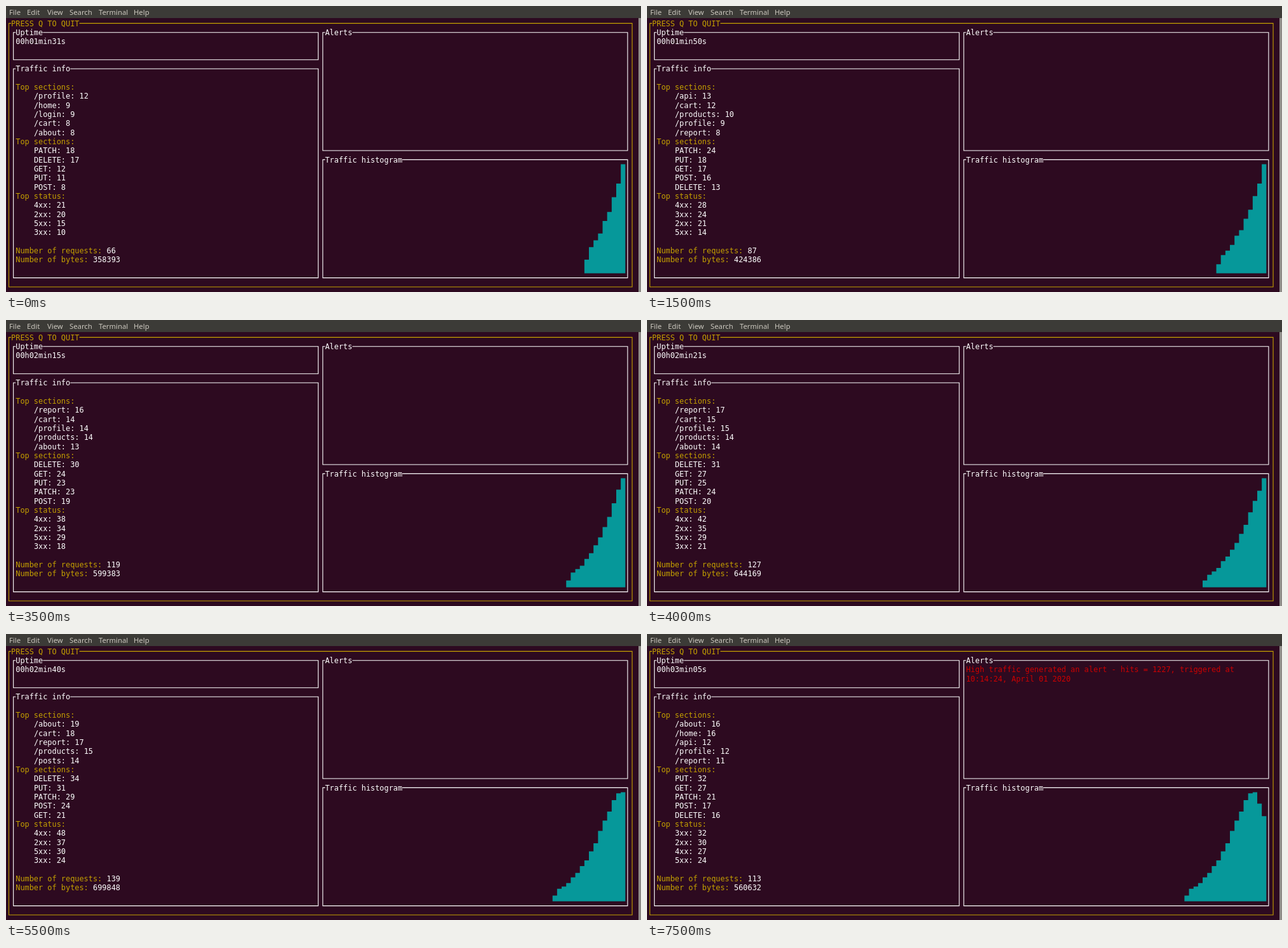
Animation of 1000 by 451 pixels, one loop 8 s. Source, as an HTML page with a canvas:

```html
<!DOCTYPE html>
<html lang="en">
<head>
<meta charset="utf-8">
<title>Traffic monitor</title>
<style>
  html, body { margin: 0; width: 100%; height: 100%; overflow: hidden; background: #2d0a20; }
  canvas { display: block; }
</style>
</head>
<body>
<canvas id="screen" width="1000" height="451"></canvas>
<script>
const ctx = document.getElementById('screen').getContext('2d');
const LOOP = 8000, TICK = 500;
const CELL_W = 7.165, CELL_H = 14.33;
const WHITE = '#ffffff', YELLOW = '#c4a000', TEAL = '#06989a', RED = '#cc0000';

const snapshot = (tick, bytes, ...lists) => ({
  tick, bytes,
  lists: lists.map(list => list.split(', ').map(entry => {
    const [name, count] = entry.split(' ');
    return { name, count: +count };
  }))
});

const snapshots = [
  snapshot(0, 358393, '/profile 12, /home 9, /login 9, /cart 8, /about 8',
    'PATCH 18, DELETE 17, GET 12, PUT 11, POST 8', '4xx 21, 2xx 20, 5xx 15, 3xx 10'),
  snapshot(2, 364156, '/api 13, /cart 11, /products 9, /profile 8, /report 7',
    'PATCH 23, PUT 15, GET 15, POST 14, DELETE 10', '4xx 26, 3xx 20, 2xx 18, 5xx 13'),
  snapshot(5, 544846, '/cart 14, /profile 13, /contact 12, /home 11, /api 11',
    'DELETE 26, PUT 23, GET 21, POST 19, PATCH 18', '2xx 33, 4xx 31, 5xx 26, 3xx 17'),
  snapshot(7, 599383, '/report 16, /cart 14, /profile 14, /products 14, /about 13',
    'DELETE 30, GET 24, PUT 23, PATCH 23, POST 19', '4xx 38, 2xx 34, 5xx 29, 3xx 18'),
  snapshot(10, 733740, '/about 19, /cart 18, /report 17, /products 15, /posts 15',
    'DELETE 34, PUT 32, PATCH 29, POST 27, GET 22', '4xx 51, 2xx 38, 5xx 29, 3xx 26'),
  snapshot(13, 632063, '/about 19, /contact 17, /login 16, /cart 14, /home 12',
    'PATCH 34, POST 29, GET 28, DELETE 19, PUT 19', '4xx 41, 5xx 35, 2xx 32, 3xx 21'),
  snapshot(15, 560632, '/about 16, /home 16, /api 12, /profile 12, /report 11',
    'PUT 32, GET 27, PATCH 21, POST 17, DELETE 16', '3xx 32, 2xx 30, 4xx 27, 5xx 24')
];

// One histogram bar for every ten seconds of uptime.
const traffic = [5.6, 11, 13.5, 16.6, 21.5, 25.2, 31.2, 36.9, 44.5,
  51.8, 62.2, 71.6, 79.7, 89.5, 95.2, 96, 86, 75];

// Left edge of a column and vertical centre of a row in the character grid.
const colX = col => 0.9 + col * CELL_W;
const rowY = row => 27.4 + row * CELL_H;
const pad = n => String(n).padStart(2, '0');

function text(str, col, row, color = WHITE) {
  ctx.font = '11.9px "DejaVu Sans Mono", monospace';
  ctx.fillStyle = color;
  ctx.fillText(str, colX(col), rowY(row) + 4.4);
}

function panel(title, left, top, right, bottom, color = WHITE) {
  const [x1, x2] = [left, right].map(col => colX(col + 0.5));
  const [y1, y2] = [top, bottom].map(rowY);
  ctx.strokeStyle = color;
  ctx.lineWidth = 1.1;
  ctx.beginPath();
  ctx.moveTo(colX(left + 1), y1);
  ctx.lineTo(x1, y1);
  ctx.lineTo(x1, y2);
  ctx.lineTo(x2, y2);
  ctx.lineTo(x2, y1);
  ctx.lineTo(colX(left + 1 + title.length), y1);
  ctx.stroke();
  text(title, left + 1, top, color);
}

function statsAt(tick) {
  const next = Math.max(1, snapshots.findIndex(s => s.tick >= tick));
  const a = snapshots[next - 1], b = snapshots[next];
  const p = (tick - a.tick) / (b.tick - a.tick);
  const mix = (from, to) => Math.round(from + (to - from) * p);
  const nearest = p < 0.5 ? a : b;
  return {
    bytes: mix(a.bytes, b.bytes),
    lists: nearest.lists.map((list, i) => list.map(({ name }, j) => ({
      name, count: mix(a.lists[i][j].count, b.lists[i][j].count)
    })))
  };
}

function drawStats(tick) {
  const { bytes, lists } = statsAt(tick);
  const titles = ['Top sections:', 'Top sections:', 'Top status:'];
  let row = 7;
  lists.forEach((list, i) => {
    text(titles[i], 2, row++, YELLOW);
    for (const { name, count } of list) text(`${name}: ${count}`, 6, row++);
  });
  const requests = lists[2].reduce((sum, { count }) => sum + count, 0);
  text('Number of requests:', 2, 25, YELLOW);
  text(requests, 22, 25);
  text('Number of bytes:', 2, 26, YELLOW);
  text(bytes, 19, 26);
}

function drawHistogram(uptime) {
  const bars = traffic.slice(0, Math.floor(uptime / 10));
  const peak = Math.max(...bars);
  const base = rowY(27.5);
  ctx.fillStyle = TEAL;
  ctx.beginPath();
  bars.forEach((value, i) => {
    const height = Math.floor(value / peak * 96) * CELL_H / 8;
    ctx.rect(colX(136 - bars.length + i), base - height, CELL_W, height);
  });
  ctx.fill();
}

function drawWindow() {
  ctx.fillStyle = '#2d0a20';
  ctx.fillRect(0, 0, 1000, 451);
  ctx.fillStyle = '#3c3b37';
  ctx.fillRect(0, 0, 1000, 19);
  ctx.fillStyle = '#8f8c88';
  ctx.fillRect(996, 19, 4, 432);
  ctx.font = '11.3px "Noto Sans", sans-serif';
  ctx.fillStyle = '#cbc7be';
  const menu = { File: 5, Edit: 33, View: 65, Search: 100, Terminal: 146, Help: 201 };
  for (const [label, x] of Object.entries(menu)) ctx.fillText(label, x, 14.3);
}

function draw(tick) {
  const uptime = Math.floor(91.4 + tick * 6.25);
  drawWindow();
  panel('PRESS Q TO QUIT', 0, 0, 137, 29, YELLOW);
  panel('Uptime', 1, 1, 68, 4);
  panel('Traffic info', 1, 5, 68, 28);
  panel('Alerts', 69, 1, 136, 14);
  panel('Traffic histogram', 69, 15, 136, 28);
  text(`00h${pad(Math.floor(uptime / 60))}min${pad(uptime % 60)}s`, 2, 2);
  drawStats(tick);
  drawHistogram(uptime);
  if (tick >= 15) {
    text('High traffic generated an alert - hits = 1227, triggered at', 70, 2, RED);
    text('10:14:24, April 01 2020', 70, 3, RED);
  }
}

const start = performance.now();
function frame() {
  draw(Math.floor((performance.now() - start) % LOOP / TICK));
  requestAnimationFrame(frame);
}
frame();
</script>
</body>
</html>
```
